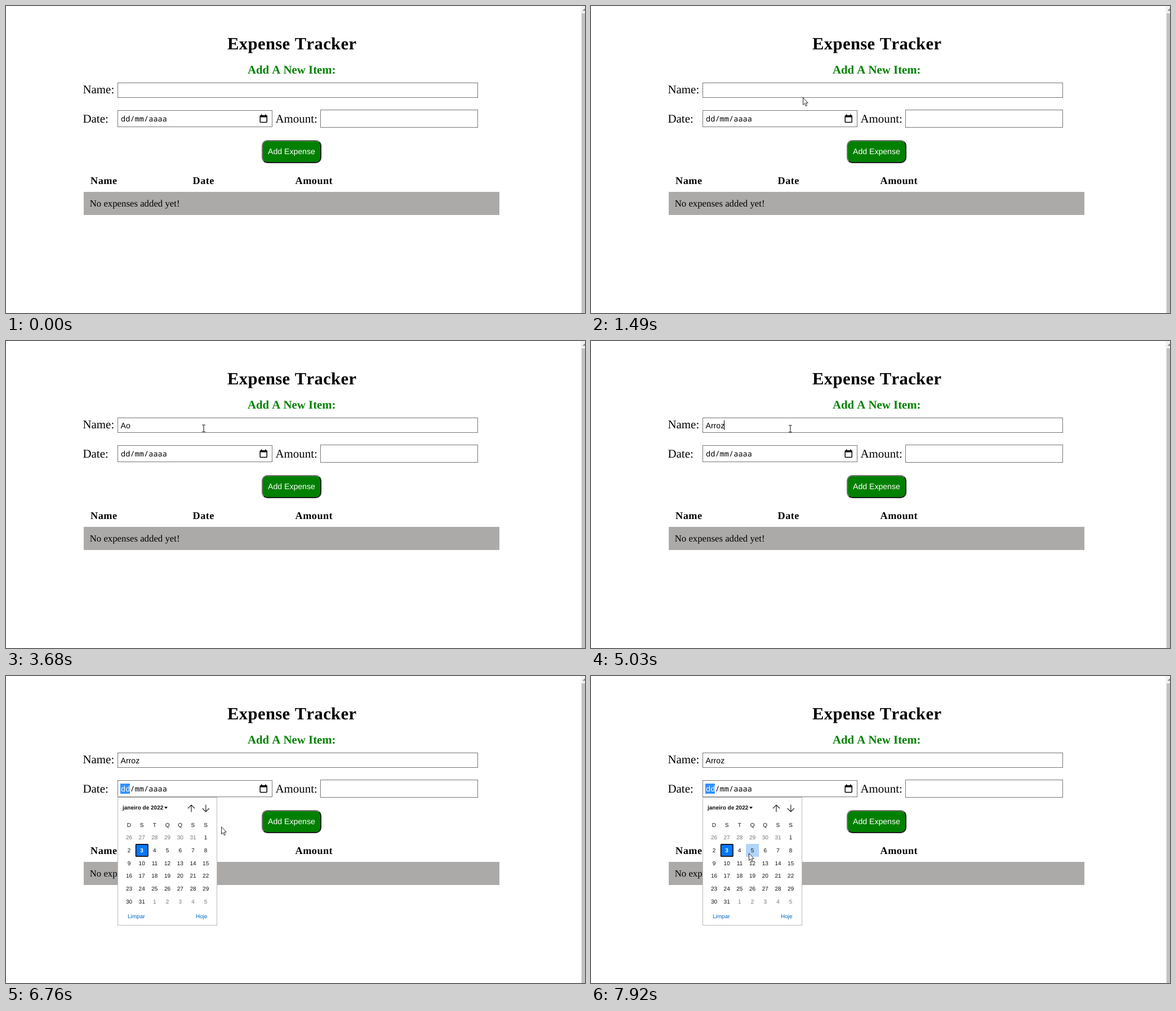
Animation of 1028 by 545 pixels, one loop 8 s. Source, as an HTML page:

```html
<!DOCTYPE html>
<html lang="en">
<head>
<meta charset="utf-8">
<title>Expense Tracker</title>
<style>
  html, body { margin: 0; width: 100%; height: 100%; overflow: hidden; background: #fff; }
  svg { position: absolute; left: 0; top: 0; }
  text { white-space: pre; font-kerning: none; text-rendering: geometricPrecision; }
  .serif { font-family: "Liberation Serif", serif; }
  .sans { font-family: "Liberation Sans", sans-serif; font-size: 14.1px; }
  .mono { font-family: "Noto Sans Mono", monospace; font-size: 13.5px; letter-spacing: .1px; }
  .title { font-size: 30.6px; font-weight: bold; letter-spacing: .4px; }
  .subtitle { font-size: 20.8px; font-weight: bold; fill: green; }
  .label { font-size: 20.9px; }
  .head { font-size: 18.2px; font-weight: bold; letter-spacing: .5px; }
  .field { fill: #fff; stroke: #767676; }
  #button {
    position: absolute; left: 454px; top: 238px; width: 106px; height: 41px;
    box-sizing: border-box; border: 2px solid; border-radius: 10px;
    border-color: #767676 #1c1c1c #1c1c1c #767676; background: green;
  }
  #names text { font: 10.4px "Noto Sans", sans-serif; fill: #222; }
  #names rect { fill: #fff; filter: drop-shadow(0 1px 1px #0005); }
  #calendar text { font: 10px "Liberation Sans", sans-serif; fill: #101010; }
  #calendar .day { text-anchor: middle; }
  #calendar .outer { fill: #767676; }
  #calendar .picked { fill: #fff; font-weight: bold; }
  #calendar .month { font-weight: bold; }
  #calendar .link { fill: #0067c0; }
</style>
</head>
<body>
<div id="button"></div>
<svg width="1028" height="545" viewBox="0 0 1028 545">
  <g class="serif">
    <text class="title" x="393" y="77">Expense Tracker</text>
    <text class="subtitle" x="429" y="119.5">Add A New Item:</text>
    <text class="label" x="136.5" y="155">Name:</text>
    <text class="label" x="136.5" y="207">Date:</text>
    <text class="label" x="478.5" y="207">Amount:</text>
    <text class="head" x="150" y="316">Name</text>
    <text class="head" x="331.5" y="316">Date</text>
    <text class="head" x="513.5" y="316">Amount</text>
    <rect x="138" y="330" width="738" height="41" fill="#acaaa8"/>
    <text x="148.7" y="356" font-size="16.8">No expenses added yet!</text>
  </g>
  <text class="sans" x="465" y="263" fill="#fff">Add Expense</text>

  <rect class="field" x="198.5" y="136.5" width="639" height="26"/>
  <rect class="field" x="198.5" y="185.5" width="274" height="29"/>
  <rect class="field" x="558.5" y="184.5" width="279" height="31"/>
  <text id="typed" class="sans" x="203.5" y="154.5"></text>
  <rect id="caret" y="141" width="1" height="17"/>
  <rect id="mark" x="203" y="191" width="17" height="18" fill="#3390ff"/>
  <text class="mono" x="204" y="205"><tspan id="dd">dd</tspan>/mm/aaaa</text>
  <rect x="451.2" y="194.7" width="12" height="11.8" rx="1" fill="none" stroke="#000" stroke-width="1.5"/>
  <path d="M451 194h12.5v3.6h-12.5zM453 192.3h1.6v2h-1.6zM460 192.3h1.6v2h-1.6z"/>

  <rect x="1020.3" width="8" height="545" fill="#f1f1f1"/>
  <rect x="1022" y="13" width="6" height="532" fill="#c1c1c1"/>
  <path d="M1023.5 8.5l4-4 4 4z" fill="#8a8a8a"/>

  <g id="names">
    <rect x="198" y="163" width="156" height="73"/>
    <text x="206.5" y="189">Nuvio Brenca</text>
    <text x="206.5" y="218.5">Nuvio Brença</text>
  </g>

  <g id="calendar">
    <rect x="198.5" y="215.5" width="176" height="227" fill="#fff" stroke="#bababa"/>
    <text class="month" x="207" y="237">janeiro de 2022</text>
    <path d="M281 232.3h6l-3 3.4z"/>
    <path d="M329 241.5V229M323 235l6-6 6 6M354.8 228.5V241M348.8 235l6 6 6-6" fill="none" stroke="#222" stroke-width="1.2"/>
    <rect id="hover" width="23" height="23" rx="1" fill="#b0d5fb"/>
    <rect x="230.6" y="298.8" width="21.4" height="21.4" rx="1" fill="#0078ff" stroke="#101010" stroke-width="1.7"/>
    <g id="days"></g>
    <text class="link" x="216" y="430">Limpar</text>
    <text class="link" x="357.5" y="430" text-anchor="end">Hoje</text>
  </g>

  <g id="cursor">
    <circle id="halo" r="9.5" fill="#fff64a" fill-opacity=".8"/>
    <path id="arrow" d="M.5.8V13.6L3.4 10.9 5.4 15.6 7.5 14.7 5.5 10.1H9.3z" fill="#fff" stroke="#111" stroke-width=".9"/>
    <path id="beam" d="M-3-6h2.2q.8 0 .8.8V5.2q0 .8-.8.8H-3M3-6H.8Q0-6 0-5.2V5.2Q0 6 .8 6H3" fill="none" stroke="#222" stroke-width="1.1"/>
  </g>
</svg>
<script>
const LOOP = 8000, STEP = 40, CELL = 22.7;
const GRID = { x: 207.1, y: 275.4 };
const $ = id => document.getElementById(id);
const show = (id, on) => $(id).setAttribute('visibility', on ? 'visible' : 'hidden');

// Pointer moves: start time, number of steps, destination
const moves = [
  [190, 1, 1000, 535], [500, 2, 835, 464], [740, 5, 650, 325], [1060, 5, 482, 195],
  [1370, 4, 376, 162], [1530, 8, 351, 155], [5030, 5, 441, 180], [5420, 5, 455, 193],
  [6600, 5, 382, 267], [6960, 5, 299, 285.5], [7320, 5, 284, 319], [7800, 4, 280, 314]
];
// Typing: time, text, caret x
const typing = [
  [0, '', 203], [3030, 'A', 212], [3130, 'Ao', 220], [3840, 'A', 212],
  [4080, 'Ar', 217], [4240, 'Arr', 222], [4400, 'Arro', 229], [4640, 'Arroz', 236]
];
const caretShown = [[2050, 2620], [3030, 3680], [4080, 5150], [5700, 5900]];

const within = (t, a, b) => t >= a && t < b;
const ease = p => p < .5 ? 4 * p ** 3 : 1 - 4 * (1 - p) ** 3;
const stepped = (t, start, steps) => Math.min(1, (Math.floor((t - start) / STEP) + 1) / steps);

function pointer(t) {
  let x = 1100, y = 600;
  for (const [start, steps, toX, toY] of moves) {
    if (t < start) break;
    const k = ease(stepped(t, start, steps));
    x += (toX - x) * k;
    y += (toY - y) * k;
  }
  return { x, y };
}

function addDay(label, col, row, kind) {
  const x = GRID.x + (col + .5) * CELL, y = GRID.y + (row + .5) * CELL + 3.6;
  $('days').insertAdjacentHTML('beforeend',
    `<text class="day ${kind}" x="${x}" y="${y}">${label}</text>`);
}
[...'DSTQQSS'].forEach((letter, col) => addDay(letter, col, -1, ''));
for (let i = 0; i < 42; i++) {
  const day = i - 5, outer = day < 1 || day > 31;
  addDay((day + 30) % 31 + 1, i % 7, Math.floor(i / 7),
    outer ? 'outer' : day === 3 ? 'picked' : '');
}

function draw(t) {
  const { x, y } = pointer(t);
  const overName = y < 161;
  $('cursor').setAttribute('transform', `translate(${x} ${y})`);
  show('arrow', !overName);
  show('beam', overName);
  show('halo', within(t, 2050, 2300) || within(t, 5900, 6040));
  $('halo').setAttribute('cx', overName ? -2 : 0);

  const [, text, caretX] = typing.findLast(([start]) => t >= start);
  $('typed').textContent = text;
  $('caret').setAttribute('x', caretX);
  show('caret', caretShown.some(([a, b]) => within(t, a, b)));

  $('names').setAttribute('opacity', within(t, 2100, 3030) ? stepped(t, 2100, 3) : 0);
  show('mark', t >= 5900);
  $('dd').setAttribute('fill', t >= 5900 ? '#fff' : '#000');

  const open = t >= 6120;
  const col = Math.floor((x - GRID.x) / CELL), row = Math.floor((y - GRID.y) / CELL);
  show('calendar', open);
  show('hover', open && within(col, 0, 7) && within(row, 0, 6));
  $('hover').setAttribute('x', GRID.x + col * CELL);
  $('hover').setAttribute('y', GRID.y + row * CELL);
}

function frame() {
  draw(performance.now() % LOOP);
  requestAnimationFrame(frame);
}
frame();
</script>
</body>
</html>
```
